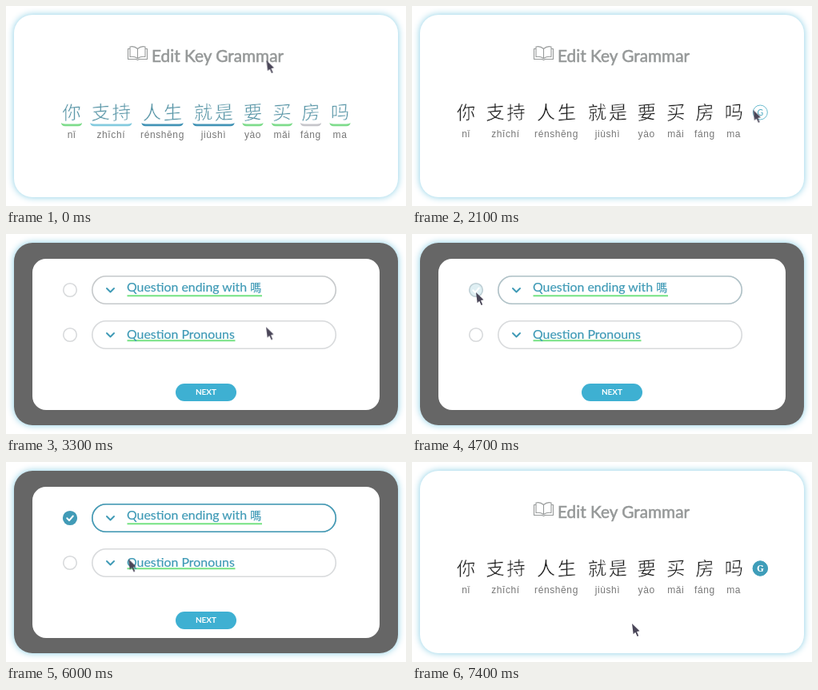
Write an HTML page that moves like this. It is 500 px wide and 250 px high and loops after 8200 ms.

```html
<!DOCTYPE html>
<html lang="en">
<head>
<meta charset="utf-8">
<title>Edit Key Grammar</title>
<style>
  html, body { margin: 0; width: 100%; height: 100%; overflow: hidden; background: #fff; }
  svg { display: block; width: 100vw; height: 100vh; }
  text { font-family: Lato, sans-serif; }

  .card { fill: #fff; filter: drop-shadow(0 0 4px #86cde4); }
  .title { font-size: 20.8px; fill: #959898; stroke: #959898; stroke-width: .55px; }
  .icon { fill: none; stroke: #979a9a; stroke-width: 1.1; stroke-linejoin: round; }

  /* The white stroke thins the glyphs. */
  .hanzi { font: 300 23.5px "Noto Sans CJK SC", "Noto Sans CJK", sans-serif; text-anchor: middle; stroke: #fff; stroke-width: .5px; }
  .pinyin { font: 12px "Liberation Sans", sans-serif; letter-spacing: .6px; fill: #777; text-anchor: middle; }
  .marked .hanzi { fill: #5b97a8; }
  .plain .hanzi { fill: #1c1c1c; }

  .ring { fill: #fff; stroke: #66b9cd; stroke-width: 1; }
  .badge { text-anchor: middle; font-size: 10.5px; fill: #4fa9c0; }
  .solid .ring { fill: #3f9db9; stroke: #3f9db9; }
  .solid .badge { font: bold 11.5px "Noto Serif", serif; fill: #fff; }

  .option { fill: #fff; stroke: #d8dadc; stroke-width: 1.6; }
  .first { stroke: #c6c9cb; }
  .label { font-size: 15.9px; fill: #3f9ab6; stroke: #3f9ab6; stroke-width: .2px; }
  .han { font: 14px "Noto Sans CJK TC", "Noto Sans CJK", sans-serif; }
  .chevron { fill: none; stroke: #3f9ab6; stroke-width: 1.9; stroke-linecap: round; stroke-linejoin: round; }
  .rule { stroke: #76e283; stroke-width: 2; }
  .next { font-weight: 700; font-size: 10px; fill: #fff; text-anchor: middle; }
  .picked { fill: none; stroke: #419bb7; stroke-width: 1.6; }
  .tick { fill: none; stroke: #fff; stroke-width: 2; stroke-linecap: round; stroke-linejoin: round; }

  .marked, .plain, .solid, .modal, .chosen, .cursor { animation: 8.2s linear infinite; }
  .marked { animation-name: fade-out; }
  .plain { animation-name: fade-in; }
  .solid { animation-name: fill-badge; animation-timing-function: step-end; }
  .modal { animation-name: modal; }
  .chosen { animation-name: choose; }
  .cursor { animation-name: travel; fill: #4a4658; }

  @keyframes fade-out {
    0% { opacity: 1; }
    6.097% { opacity: 1; animation-timing-function: steps(3, start); }
    9.756%, 100% { opacity: 0; }
  }
  @keyframes fade-in {
    0% { opacity: 0; }
    6.097% { opacity: 0; animation-timing-function: steps(3, start); }
    9.756%, 100% { opacity: 1; }
  }
  @keyframes fill-badge {
    0% { opacity: 0; }
    65%, 100% { opacity: 1; }
  }
  @keyframes modal {
    0% { opacity: 0; }
    30.487% { opacity: 0; animation-timing-function: steps(2, start); }
    32.926% { opacity: 1; }
    89.024% { opacity: 1; animation-timing-function: steps(2, start); }
    91.463%, 100% { opacity: 0; }
  }
  @keyframes choose {
    0% { opacity: 0; }
    57.317% { opacity: 0; animation-timing-function: steps(6, start); }
    64.634%, 100% { opacity: 1; }
  }
  @keyframes travel {
    0% { transform: translate(325.5px, 68px); }
    14.634% { transform: translate(325.5px, 68px); animation-timing-function: steps(11, start); }
    28.048% { transform: translate(436.5px, 136px); }
    35.365% { transform: translate(436.5px, 136px); animation-timing-function: steps(16, start); }
    54.878% { transform: translate(80px, 73px); }
    67.073% { transform: translate(80px, 73px); animation-timing-function: steps(16, start); }
    86.585%, 100% { transform: translate(275px, 202px); }
  }
</style>
</head>
<body>
<svg viewBox="0 0 500 250">
  <rect class="card" x="10" y="11" width="480" height="228" rx="23"/>

  <g class="icon">
    <path d="M164.5 53.5Q160 49.5 155 51V63.5Q160 62.5 164.5 65.5Q169 62.5 174 63.5V51Q169 49.5 164.5 53.5V65.5"/>
    <path d="M155 53.5H152.5V66.5H162.5L164.5 67.5L166.5 66.5H176.5V53.5H174"/>
  </g>
  <text class="title" x="182" y="70">Edit Key Grammar</text>

  <g class="marked" id="marked"></g>
  <g class="plain">
    <g id="plain"></g>
    <circle class="ring" cx="435.3" cy="133" r="9"/>
    <text class="badge" x="435.3" y="136.8">G</text>
    <g class="solid">
      <circle class="ring" cx="435.3" cy="133" r="9.2"/>
      <text class="badge" x="435.3" y="137.2">G</text>
    </g>
  </g>

  <g class="modal">
    <rect x="10" y="11" width="480" height="228" rx="23" opacity=".6"/>
    <rect x="33" y="31" width="434" height="189" rx="17" fill="#fff"/>

    <circle class="option" cx="80" cy="70" r="8.3"/>
    <rect class="option first" x="107.8" y="52.8" width="304.5" height="34.5" rx="17.25"/>
    <circle class="option" cx="80" cy="126" r="8.3"/>
    <rect class="option" x="107.8" y="108.8" width="304.5" height="34.5" rx="17.25"/>

    <g class="chosen">
      <rect class="picked" x="107.8" y="52.8" width="304.5" height="34.5" rx="17.25"/>
      <circle cx="80" cy="70" r="9.1" fill="#419bb7"/>
      <path class="tick" d="M76.3 70.3l2.7 2.8 4.8-5.6"/>
    </g>

    <path class="chevron" d="M126 68l4.5 4.5 4.5-4.5M126 124l4.5 4.5 4.5-4.5"/>
    <path class="rule" d="M151.5 77.3H320M151.5 133.3H286.5"/>
    <text class="label" x="151" y="72.3">Question ending with <tspan class="han">嗎</tspan></text>
    <text class="label" x="151" y="131">Question Pronouns</text>

    <rect x="212" y="187" width="76" height="22" rx="11" fill="#3eb0d2"/>
    <text class="next" x="250" y="201.3">NEXT</text>
  </g>

  <path class="cursor" d="M0 0L1.7 13.3L4.2 10.7L6.6 16L8.2 15.2L6 10L9.5 9.2Z"/>
</svg>
<script>
  const GREEN = '#7fdc8c', SKY = '#84cbdf', BLUE = '#4394b6', GRAY = '#c6c6cb';

  // text, pinyin, centre when plain, centre when marked, underline colour
  const words = [
    ['你', 'nǐ', 67.5, 82, GREEN],
    ['支持', 'zhīchí', 117, 131.3, SKY],
    ['人生', 'rénshēng', 180.5, 195.5, BLUE],
    ['就是', 'jiùshì', 244.5, 259.5, BLUE],
    ['要', 'yào', 293.2, 308.5, GREEN],
    ['买', 'mǎi', 329.7, 345, GREEN],
    ['房', 'fáng', 366, 381, GRAY],
    ['吗', 'ma', 402.2, 417.5, GREEN]
  ];

  // Each character leans upward to the right, like brush script.
  const hanzi = (text, x) => [...text].map((char, i) => {
    const cx = x + (i - (text.length - 1) / 2) * 26;
    return `<text class="hanzi" transform="translate(${cx} 132.5) skewY(-5)" y="9">${char}</text>`;
  }).join('');

  const pinyin = (text, x, y) => `<text class="pinyin" x="${x}" y="${y}">${text}</text>`;

  // A flat bar whose ends taper upward.
  const bar = (text, x, color) => {
    const half = text.length * 13, flat = 2 * half - 10;
    return `<path fill="${color}" d="M${x - half} 145.8q1 1.6 5 1.6h${flat}q4 0 5-1.6q0 4.4-5 4.4h${-flat}q-5 0-5-4.4"/>`;
  };

  const fill = (id, draw) => {
    document.getElementById(id).innerHTML = words.map(draw).join('');
  };

  fill('plain', ([text, sound, x]) => hanzi(text, x) + pinyin(sound, x, 164));
  fill('marked', ([text, sound, , x, color]) => hanzi(text, x) + bar(text, x, color) + pinyin(sound, x, 164.7));
</script>
</body>
</html>
```
